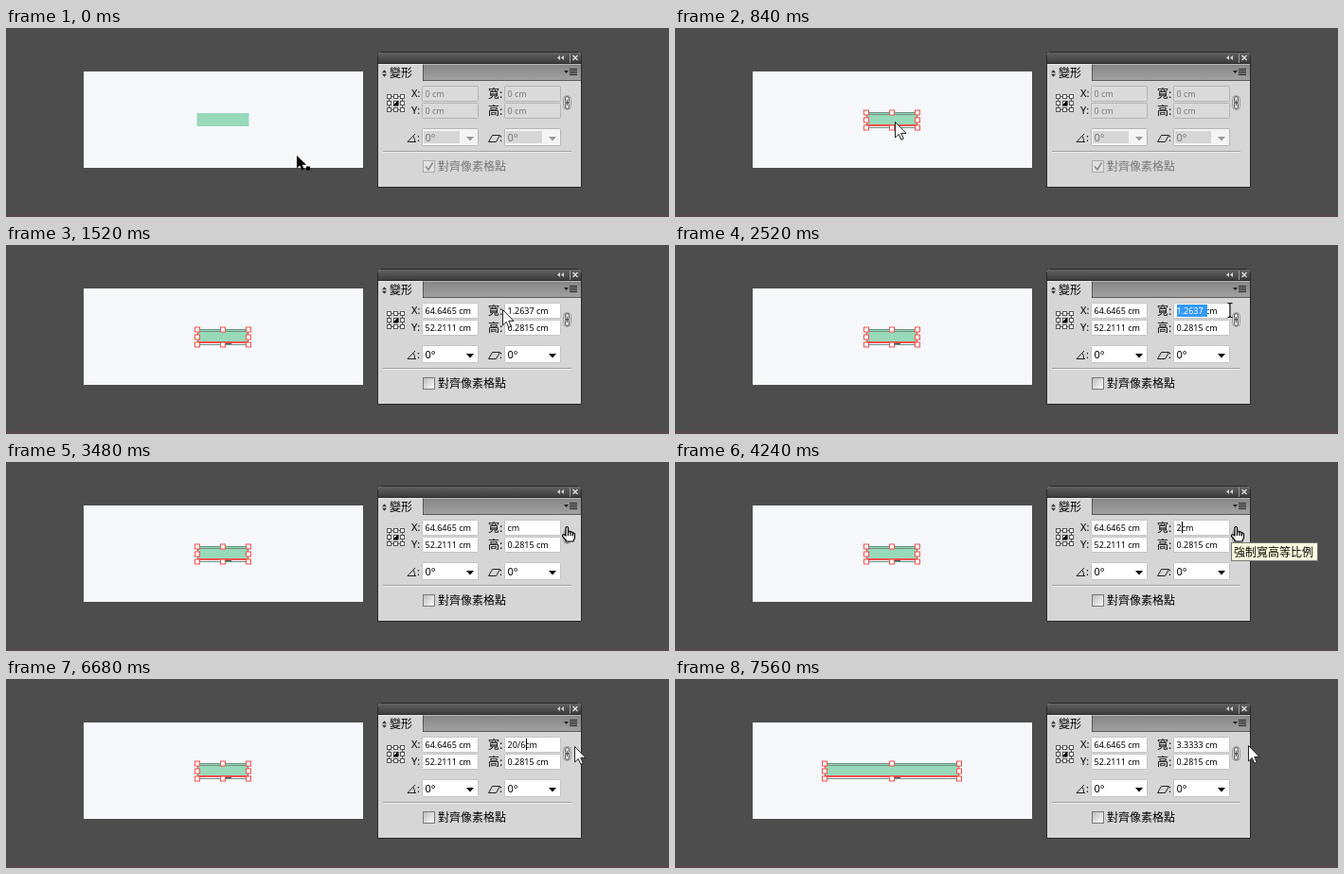
These frames come from a looping animation (700 px wide and 200 px high, 9920 ms). An HTML page:

```html
<!DOCTYPE html>
<html lang="zh-Hant">
<head>
<meta charset="utf-8">
<title>變形</title>
<style>
html, body { margin: 0; width: 100%; height: 100%; overflow: hidden; background: #4d4d4d; }
svg { display: block; width: 700px; height: 200px; }
text { font: 500 9px "Noto Sans", sans-serif; fill: #000; white-space: pre; }
.cjk { font: 12px "Noto Sans CJK TC", "Noto Sans CJK", sans-serif; }
.label { font-size: 11px; font-weight: 400; }
.box { fill: #fff; stroke: #c4c4c4; }
.inner { fill: none; }
.arrow { fill: #000; }
.check-box { fill: url(#check); stroke: #777; }
.off .check-box { fill: #e2e2e2; stroke: #aaa; }
.off .box { fill: #dadada; stroke: #b4b4b4; }
.off .combo { fill: #f4f4f4; }
.off .inner { fill: #d6d6d6; }
.off .arrow { fill: #999; }
.off .value, .off .check { fill: #777; }
.off .tick { visibility: visible; }
.tick { visibility: hidden; fill: none; stroke: #888; stroke-width: 1.6; }
.line { fill: none; stroke: #222; }
</style>
</head>
<body>
<svg viewBox="0 0 700 200">
  <defs>
    <linearGradient id="bar" x2="0" y2="1"><stop stop-color="#626262"/><stop offset="1" stop-color="#393939"/></linearGradient>
    <linearGradient id="tabs" x2="0" y2="1"><stop stop-color="#858585"/><stop offset="1" stop-color="#a2a2a2"/></linearGradient>
    <linearGradient id="check" x2="1" y2="1"><stop stop-color="#bbb"/><stop offset="1" stop-color="#fff"/></linearGradient>
  </defs>
  <rect width="700" height="200" fill="#4d4d4d"/>
  <rect y="197" width="700" height="3" fill="#574a4d"/>
  <rect x="82" y="46" width="295" height="102" fill="#f6f8fb"/>
  <rect id="shape" y="90" height="14" fill="#97d9b9"/>
  <g id="selection"></g>

  <g id="panel">
    <path d="M392.500 168.500V28.500q0-3 3-3H604.500q3 0 3 3V168.500z" fill="#d6d6d6" stroke="#292929"/>
    <path d="M393 38V29q0-3 3-3H604q3 0 3 3V38z" fill="url(#bar)"/>
    <rect x="440" y="38" width="167" height="18" fill="url(#tabs)"/>
    <path d="M393 37.500H607M440.500 38V56M440 55.500H607" class="line" stroke-opacity=".55"/>
    <path d="M393 38.500H607" stroke="#fff" stroke-opacity=".4"/>
    <path d="M585 29v5l-3-2.500zM589 29v5l-3-2.500z" fill="#d5d5d5"/>
    <path d="M595.500 27V37" stroke="#999"/>
    <path d="M598.500 29l5 5m0-5l-5 5" stroke="#ddd" stroke-width="1.400"/>
    <path d="M589 45h5l-2.500 3z" fill="#222"/>
    <path d="M595 43.500h8m-8 2h8m-8 2h8m-8 2h8" class="line"/>
    <path d="M397 47.300l2.500-3 2.500 3zM397 48.700l2.500 3 2.500-3z" fill="#333"/>
    <text class="cjk" x="405" y="52">變形</text>
    <g id="anchor"></g>
    <text class="label" x="428" y="73">X:</text>
    <text class="label" x="428" y="91">Y:</text>
    <text class="cjk" x="509" y="74">寬:</text>
    <text class="cjk" x="509" y="92">高:</text>
    <path d="M432 112l-8 8.500h9m-3-6q2 2.500 1.500 6" class="line"/>
    <path d="M513.500 113.500h8l-4 7h-8z" class="line"/>
    <text class="label" x="434" y="120">:</text>
    <text class="label" x="521" y="120">:</text>
    <g id="fields"></g>
    <g fill="none" stroke="#555">
      <rect x="588.500" y="71.500" width="8" height="15" rx="4" fill="#ddd" stroke="#999"/>
      <rect x="590.500" y="72.500" width="4" height="7" rx="2"/>
      <rect x="590.500" y="78.500" width="4" height="7" rx="2"/>
      <path d="M592.500 76v6"/>
    </g>
    <path d="M398 130.500H597" stroke="#a0a0a0"/>
    <path d="M398 131.500H597" stroke="#eee"/>
    <rect class="check-box" x="440.500" y="140.500" width="12" height="12"/>
    <path class="tick" d="M443 146.500l3 3.500 4.500-7.500"/>
    <text class="cjk check" x="456" y="151">對齊像素格點</text>
  </g>
  <g id="picked">
    <rect x="530" y="63" height="13" fill="#3399ff"/>
    <text x="529.500" y="73" style="fill:#fff"></text>
  </g>
  <path id="caret" d="M.5 63v12" stroke="#000"/>
  <g id="tip">
    <rect x="587.500" y="85.500" width="91" height="19" fill="#ffffe1" stroke="#767676"/>
    <text class="cjk" x="590" y="99.500">強制寬高等比例</text>
  </g>
  <g id="cursor">
    <g id="pick"><path d="M0 0V13.500L3.200 10.600 5.500 15.500 7.800 14.500 5.600 9.700H10z"/><rect x="10" y="11.500" width="4" height="4"/></g>
    <path id="arrow" d="M.5 .5V17L4.300 13.400 6.800 19.300 9.300 18.200 6.800 12.400H12z" fill="#fff" stroke="#222"/>
    <path id="beam" d="M-2.500-7.500h2l.5 1 .5-1h2M0-7V7M-2.500 7.500h2l.5-1 .5 1h2" fill="none" stroke="#000"/>
    <path id="hand" d="M-1 10V1.500Q0-.5 1.500 1.500V6L4 5.500 6.500 6.500 8.500 8V12L7 16H0L-4.500 10.500Q-4.500 8-2.500 9zM1.500 5.500v4.500M4 5.500v4.500M6.300 6.500v4" fill="#fff" stroke="#000" stroke-width="1.200"/>
  </g>
</svg>
<script>
const LOOP = 9920, STEP = 40, ENABLED = 880, COMMIT = 7400;
const $ = id => document.getElementById(id);

function add(parent, tag, attrs, content = '') {
  const node = document.createElementNS('http://www.w3.org/2000/svg', tag);
  for (const key in attrs) node.setAttribute(key, attrs[key]);
  node.textContent = content;
  return parent.appendChild(node);
}

// time, x, y, pointer
const path = [
  [0, 307, 135, 'pick'], [560, 232, 99, 'pick'], [840, 232, 99, 'arrow'],
  [1520, 524, 68, 'arrow'], [1680, 530, 69, 'beam'], [2320, 530, 69, 'beam'],
  [2520, 586, 69, 'beam'], [2600, 586, 69, 'beam'], [2640, 592, 71, 'beam'],
  [2840, 592, 68, 'hand'], [3120, 593, 68, 'hand'], [3480, 592, 68, 'hand'],
  [6400, 592, 68, 'hand'], [6440, 593, 71, 'arrow'], [6640, 600, 71, 'arrow'],
  [6680, 600, 71, 'arrow'], [6840, 605, 70, 'arrow']
];
const widthText = [
  [0, '0 cm'], [ENABLED, '1.2637 cm'], [2840, 'cm'], [4000, '2cm'], [4280, '20cm'],
  [5000, '20/cm'], [5640, '20/6cm'], [COMMIT, '3.3333 cm']
];
const caretX = [
  [0, 0], [2840, 530], [3280, 0], [3760, 530], [4000, 535], [4280, 540], [4720, 0],
  [5000, 544], [5320, 0], [5640, 549], [6080, 0], [6560, 549], [7040, 0]
];

const indexAt = (table, t) => table.findLastIndex(row => row[0] <= t);
const valueAt = (table, t) => table[indexAt(table, t)][1];
const show = (node, on) => { node.style.display = on ? '' : 'none'; };

for (const y of [72.5, 79.5, 86.5]) for (const x of [404.5, 411.5, 418.5]) {
  add($('anchor'), 'rect', { x: x - 2, y: y - 2, width: 4, height: 4, fill: '#fff', stroke: '#555' });
}
add($('anchor'), 'path', { d: 'M414 77v5h-5z', stroke: '#000' });
add($('anchor'), 'path', { d: 'M407 72.500h2m5 0h2M407 86.500h2m5 0h2M404.500 75v2m0 5v2M418.500 75v2m0 5v2', stroke: '#555' });

function field(x, y) {
  add($('fields'), 'rect', { class: 'box', x: x + .5, y: y + .5, width: 59, height: 16, rx: 1 });
  return add($('fields'), 'text', { class: 'value', x: x + 3.5, y: y + 12 });
}
function combo(x) {
  add($('fields'), 'rect', { class: 'box combo', x: x + .5, y: 106.5, width: 59, height: 18, rx: 1 });
  add($('fields'), 'rect', { class: 'inner', x: x + 2, y: 109, width: 38, height: 13 });
  add($('fields'), 'path', { class: 'arrow', d: `M${x + 47} 115h8l-4 4.500z` });
  add($('fields'), 'text', { class: 'value label', x: x + 3.5, y: 119.5 }, '0°');
}
const xField = field(439, 61), yField = field(439, 79);
const wField = field(526, 61), hField = field(526, 79);
combo(439);
combo(526);

const outline = add($('selection'), 'path', { fill: 'none', stroke: '#6f8f80' });
const edge = add($('selection'), 'path', { fill: 'none', stroke: '#f4504c' });
const baseline = add($('selection'), 'path', { stroke: '#f4504c', 'stroke-width': 2 });
add($('selection'), 'path', { d: 'M232 104.500h6', stroke: '#555' });
const handles = [];
for (const y of [89, 97, 105]) for (const side of [-1, 0, 1]) {
  if (!side && y === 97) continue;
  handles.push([side, add($('selection'), 'rect', {
    y: y - 2, width: 5, height: 5, fill: '#fff', stroke: '#f4504c'
  })]);
}

function drawShape(t) {
  const half = t < COMMIT ? 27 : 71, left = 229 - half, right = 229 + half;
  $('shape').setAttribute('x', left - .5);
  $('shape').setAttribute('width', half * 2 + 1);
  show($('selection'), t >= 680);
  outline.setAttribute('d', `M${left} 89.500H${right}M${left} 91.500H${right}M${left} 105.500H${right}`);
  edge.setAttribute('d', `M${left + .5} 89V105M${right - .5} 89V105`);
  baseline.setAttribute('d', `M${left} 103H${right}`);
  for (const [side, node] of handles) node.setAttribute('x', 229 + side * half - 2.5);
}

function drawPanel(t) {
  const on = t >= ENABLED;
  $('panel').classList.toggle('off', !on);
  xField.textContent = on ? '64.6465 cm' : '0 cm';
  yField.textContent = on ? '52.2111 cm' : '0 cm';
  hField.textContent = on ? '0.2815 cm' : '0 cm';
  wField.textContent = valueAt(widthText, t);

  const [mark, markText] = $('picked').children;
  const chars = Math.min(7, Math.max(0, Math.ceil((t - 2320) / 28)));
  show($('picked'), t >= 2320 && t < 2840);
  mark.setAttribute('width', chars * 32 / 7);
  markText.textContent = '1.2637 '.slice(0, chars);

  const x = valueAt(caretX, t);
  show($('caret'), x > 0);
  $('caret').setAttribute('transform', `translate(${x})`);
  show($('tip'), t >= 4000 && t < 6440);
}

function drawCursor(t) {
  const i = indexAt(path, t), [start, x, y, kind] = path[i], next = path[i + 1] || path[i];
  const p = next === path[i] ? 0 : (t - start) / (next[0] - start);
  const ease = p * p * (3 - 2 * p);
  const at = (a, b) => Math.round(a + (b - a) * ease);
  $('cursor').setAttribute('transform', `translate(${at(x, next[1])} ${at(y, next[2])})`);
  for (const node of $('cursor').children) show(node, node.id === kind);
}

const begin = performance.now();
function render(now) {
  const t = Math.floor(Math.max(0, now - begin) % LOOP / STEP) * STEP;
  drawShape(t);
  drawPanel(t);
  drawCursor(t);
  requestAnimationFrame(render);
}
render(begin);
</script>
</body>
</html>
```
